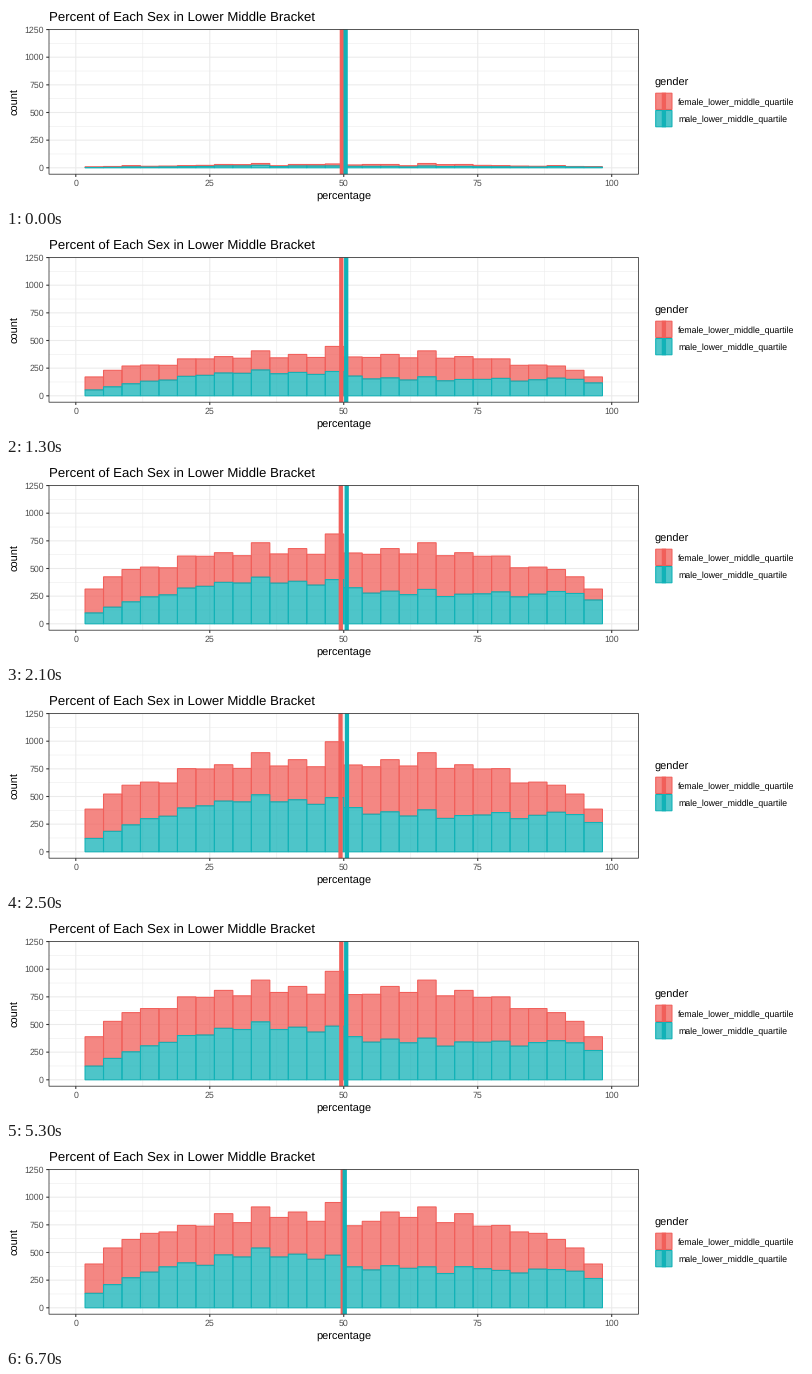
A matplotlib script that plays this animation: 800x200 px, repeating every 8 s.

```python
import matplotlib.pyplot as plt
import numpy as np
from matplotlib.animation import FuncAnimation
from matplotlib.patches import Rectangle

plt.rcParams.update({"font.family": "Liberation Sans", "text.hinting": "none",
                     "path.snap": False})

W, H, DPI = 800, 200, 100
PX = 72 / DPI
LEFT, RIGHT, TOP, BOTTOM = 43, 632.5, 23.5, 168.2
STEP, LOOP = 100, 8000
RED, TEAL = "#F15F5A", "#12B2B7"
GRID, DARK, MID = "#EBEBEB", "#333333", "#4D4D4D"
ALPHA = 0.75
BINS = 28

# counts of men per bin; women mirror them, apart from exact 50/50 ties
MEN_A = np.array([121, 185, 244, 300, 322, 397, 416, 459, 452, 516, 452, 471, 429, 490,
                  400, 340, 362, 324, 380, 302, 328, 333, 355, 300, 330, 358, 337, 265])
MEN_B = np.array([131, 210, 272, 323, 371, 407, 384, 479, 460, 541, 460, 485, 439, 476,
                  371, 343, 381, 357, 371, 310, 372, 354, 338, 315, 350, 346, 331, 265])
TIES = 105
START = np.array([9, 12, 20, 14, 16, 20, 22, 30, 29, 39, 19, 30, 30, 35])


def women(men):
    out = men[::-1].copy()
    out[13] += TIES
    out[14] -= TIES
    return out


def state(men, gap):
    return men, men + women(men), gap


def px(v):
    return LEFT + (v + 5) * (RIGHT - LEFT) / 110


def py(count):
    return 161.8 - count * 0.1106


full = state(MEN_A, 3.2)
last = state(MEN_B, 1.0)
total = np.concatenate([START, START[::-1]])
total[14] = 26
first = (total * full[0] / full[1], total, 1.9)


def mix(a, b, t):
    return [u + (v - u) * t for u, v in zip(a, b)]


fig = plt.figure(figsize=(W / DPI, H / DPI), dpi=DPI, facecolor="white")
ax = fig.add_axes([0, 0, 1, 1])
ax.set_xlim(0, W)
ax.set_ylim(H, 0)
ax.axis("off")


def line(x, y, color, width, z):
    return ax.plot(x, y, color=color, lw=width * PX, zorder=z,
                   solid_capstyle="butt")[0]


def text(x, y, s, size, color="black", ha="left", **kw):
    ax.text(x, y, s, fontsize=size * PX, color=color, ha=ha,
            va=kw.pop("va", "baseline"), **kw)


def box(x, y, w, h, color, z):
    """Translucent fill with an opaque outline."""
    patch = Rectangle((x, y), w, h, facecolor=(*plt.matplotlib.colors.to_rgb(color), ALPHA),
                      edgecolor=color, lw=1.07 * PX, zorder=z, joinstyle="miter")
    return ax.add_patch(patch)


# grid, ticks and axis labels
for i in range(9):
    x = px(12.5 * i)
    line([x, x], [TOP, BOTTOM], GRID, 0.53 if i % 2 else 1.07, 1)
    if i % 2 == 0:
        line([x, x], [BOTTOM, BOTTOM + 2.75], DARK, 1.07, 1)
        text(x, 180.2, f"{25 * i // 2}", 8.8, MID, "center")
for i in range(11):
    y = py(125 * i)
    line([LEFT, RIGHT], [y, y], GRID, 0.53 if i % 2 else 1.07, 1)
    if i % 2 == 0:
        line([LEFT - 2.75, LEFT], [y, y], DARK, 1.07, 1)
        text(38, y + 3.2, f"{125 * i}", 8.8, MID, "right")

ax.add_patch(Rectangle((LEFT, TOP), RIGHT - LEFT, BOTTOM - TOP, fill=False,
                       edgecolor=DARK, lw=0.8 * PX, zorder=6))
text(43, 15.2, "Percent of Each Sex in Lower Middle Bracket", 13.2)
text(px(50), 192.8, "percentage", 11, ha="center")
text(13.6, (TOP + BOTTOM) / 2, "count", 11, ha="right", va="center", rotation=90)

# legend
text(649, 80, "gender", 11)
for i, (name, color) in enumerate([("female", RED), ("male", TEAL)]):
    y = 86.7 + 17.28 * i
    box(649.7, y + 0.5, 16.28, 16.28, color, 3)
    line([657.9] * 2, [y, y + 17.28], color, 4.27, 4)
    text(672, y + 12, f"{name}_lower_middle_quartile", 8.8)

edges = px((np.arange(BINS + 1) + 0.5) * 100 / 29)
width = edges[1] - edges[0]
red_bars = [box(x, py(0), width, 0, RED, 2) for x in edges[:-1]]
teal_bars = [box(x, py(0), width, 0, TEAL, 3) for x in edges[:-1]]
red_mean = line([0, 0], [TOP, BOTTOM], RED, 4.27, 4)
teal_mean = line([0, 0], [TOP, BOTTOM], TEAL, 4.27, 5)


def draw(i):
    rise = np.clip((i - 4) / 21, 0, 1)
    drift = np.clip((i - 46) / 21, 0, 1)
    men, both, gap = mix(full, last, drift) if drift else mix(first, full, rise)
    for red, teal, m, b in zip(red_bars, teal_bars, men, both):
        red.set_y(py(b))
        red.set_height(py(m) - py(b))
        teal.set_y(py(m))
        teal.set_height(py(0) - py(m))
    red_mean.set_xdata([px(50) - gap] * 2)
    teal_mean.set_xdata([px(50) + gap] * 2)
    return []


anim = FuncAnimation(fig, draw, frames=LOOP // STEP, interval=STEP, repeat=True,
                     repeat_delay=0)
plt.show()
```
